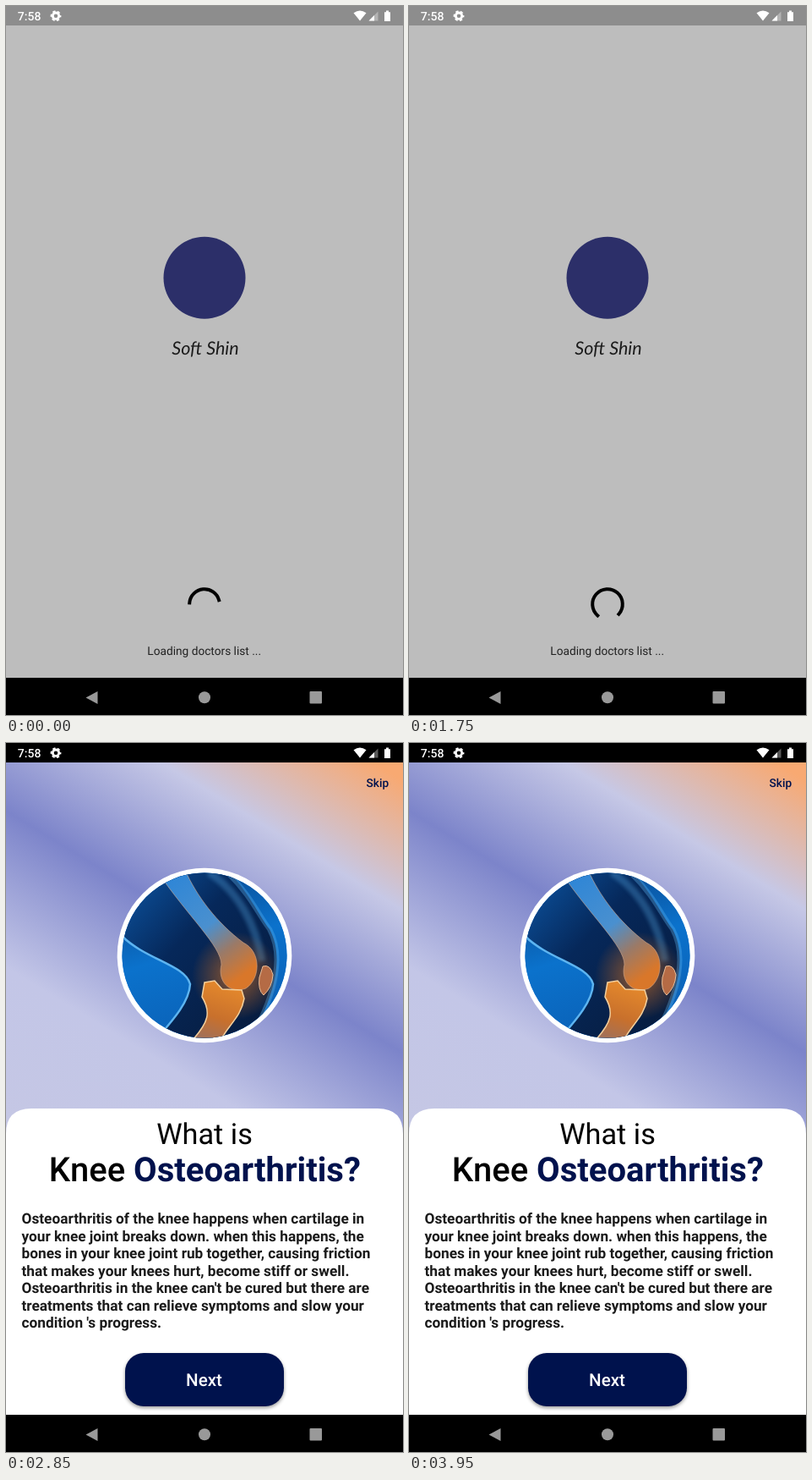
These frames come from a looping animation (470x838 px, 5000 ms). An HTML page:

```html
<!DOCTYPE html>
<html lang="en">
<head>
<meta charset="utf-8">
<title>Knee care app</title>
<style>
  html, body { margin: 0; width: 100%; height: 100%; overflow: hidden; background: #000; }
  svg { display: block; width: 470px; height: 838px; }
  text { font-family: Roboto, sans-serif; text-rendering: geometricPrecision; }
  .mid { text-anchor: middle; }
  .medium { font-weight: 500; }
  .navy { fill: #00124d; }
</style>
</head>
<body>
<svg viewBox="0 0 470 838">
  <defs>
    <linearGradient id="sky" gradientUnits="userSpaceOnUse" x1="470" y1="23" x2="0" y2="794">
      <stop offset=".02" stop-color="#f8a972"/>
      <stop offset=".165" stop-color="#c6c8e6"/>
      <stop offset=".325" stop-color="#7c84ca"/>
      <stop offset=".5" stop-color="#c3c6e7"/>
      <stop offset=".7" stop-color="#c5c7e4"/>
    </linearGradient>
    <linearGradient id="air" x1="0" y1="0" x2=".3" y2="1">
      <stop offset="0" stop-color="#0a3f80"/>
      <stop offset=".55" stop-color="#0b72cc"/>
      <stop offset="1" stop-color="#0a62b8"/>
    </linearGradient>
    <linearGradient id="skin" x1="0" y1="0" x2="1" y2="1">
      <stop offset="0" stop-color="#0c57a6"/>
      <stop offset=".4" stop-color="#06285a"/>
      <stop offset="1" stop-color="#071a3a"/>
    </linearGradient>
    <linearGradient id="femur" gradientUnits="userSpaceOnUse" x1="195" y1="160" x2="280" y2="275">
      <stop offset="0" stop-color="#2f86d6"/>
      <stop offset=".5" stop-color="#4a90cf"/>
      <stop offset=".75" stop-color="#9a7a68"/>
      <stop offset="1" stop-color="#d9772a"/>
    </linearGradient>
    <linearGradient id="tibia" x1=".6" y1="0" x2=".3" y2="1">
      <stop offset="0" stop-color="#e68a2c"/>
      <stop offset=".6" stop-color="#c8702c"/>
      <stop offset="1" stop-color="#a0705a"/>
    </linearGradient>
    <radialGradient id="glow">
      <stop offset="0" stop-color="#f07a18" stop-opacity=".6"/>
      <stop offset="1" stop-color="#f07a18" stop-opacity="0"/>
    </radialGradient>
    <clipPath id="lens"><circle cx="235" cy="251" r="97.5"/></clipPath>
    <filter id="blur"><feGaussianBlur stdDeviation="2"/></filter>
  </defs>

  <g id="splash">
    <rect width="470" height="794" fill="#bdbdbd"/>
    <rect width="470" height="23" fill="#8d8d8d"/>
    <circle cx="235" cy="321.3" r="48.5" fill="#2c2f69"/>
    <text class="mid" x="236" y="412" font-size="21.5" fill="#1c1c1c" style="font-family: Lato, cursive; font-style: italic">Soft Shin</text>
    <path id="spinner" fill="none" stroke="#000" stroke-width="4" stroke-linecap="square"/>
    <text class="mid" x="234.7" y="767" font-size="13.7" fill="#222">Loading doctors list ...</text>
  </g>

  <g id="intro">
    <rect width="470" height="23"/>
    <rect y="23" width="470" height="771" fill="url(#sky)"/>
    <text class="medium navy" x="426.5" y="51.5" font-size="13.7">Skip</text>
    <circle cx="235" cy="251" r="103.3" fill="#fff"/>
    <circle cx="235" cy="251" r="97.5" fill="#1976d2"/>
    <g id="photo" clip-path="url(#lens)">
      <rect x="137" y="153" width="196" height="196" fill="url(#air)"/>
      <path d="M137 150H262C290 180 300 205 312 220C328 250 322 290 290 350H178C200 325 217 305 218 285C210 262 165 255 137 226Z" fill="url(#skin)"/>
      <g fill="none" stroke="#5db4f0">
        <path d="M137 228C165 256 212 262 218 285C217 305 200 325 178 350" stroke-width="2.5"/>
        <path d="M262 153C290 180 300 205 312 220C328 250 322 290 290 350" stroke-width="6" opacity=".35"/>
        <path d="M240 153C275 175 296 215 303 258" stroke-width="9" opacity=".3" filter="url(#blur)"/>
      </g>
      <circle cx="272" cy="275" r="52" fill="url(#glow)"/>
      <path d="M178 150H212C225 180 250 213 281 236C302 246 302 278 284 290C266 297 250 283 255 262C255 240 215 205 178 150Z" fill="url(#femur)" stroke="#d3a98c" stroke-opacity=".6"/>
      <path d="M235 283L247 281L256 291L279 292L282 302C278 325 262 334 254 352H220C240 330 243 318 232 300Z" fill="url(#tibia)" stroke="#f3cf9c" stroke-width="1.5"/>
      <path d="M304 264Q313 261 316 274Q315 289 305 298Q298 292 300 277Z" fill="#b56b45" stroke="#e9bd97"/>
    </g>
    <path d="M0 794V462Q0 432 30 432H440Q470 432 470 462V794Z" fill="#fff"/>
    <text class="mid" x="235" y="474" font-size="34.3">What is</text>
    <text class="mid medium" x="235.3" y="518" font-size="40">Knee <tspan class="navy" font-weight="700">Osteoarthritis?</tspan></text>
    <g id="story" font-size="17.25" font-weight="700" fill="#1b1b1b"></g>
    <rect x="141" y="723" width="188" height="63" rx="22" opacity=".4" filter="url(#blur)"/>
    <rect class="navy" x="141" y="721" width="188" height="63" rx="22"/>
    <text class="mid medium" x="234.5" y="760" font-size="20.57" fill="#fff">Next</text>
  </g>

  <g fill="#fff">
    <text class="medium" x="13.8" y="17" font-size="14">7:58</text>
    <g fill="none" stroke="#fff">
      <circle cx="59" cy="11.7" r="3.7" stroke-width="2.8"/>
      <circle cx="59" cy="11.7" r="5.5" stroke-width="1.8" stroke-dasharray="3.2 2.56" stroke-dashoffset="1.6"/>
    </g>
    <path d="M411.5 8.3Q419 2.7 426.5 8.3L419 17.5Z"/>
    <path d="M440.5 6.5V17.5H429.5Z" opacity=".35"/>
    <path d="M436 11V17.5H429.5Z"/>
    <path d="M448 7.2H450V5.5H453V7.2H455V18H448Z"/>
  </g>

  <rect y="794" width="470" height="44"/>
  <g fill="#999">
    <path d="M94.5 817.5L108.5 810V825Z"/>
    <circle cx="235" cy="817.3" r="7"/>
    <rect x="359.5" y="810" width="14.5" height="14.5" rx="1"/>
  </g>
</svg>
<script>
const LOOP = 5000, INTRO_AT = 2500, PHOTO_AT = 2650, STEP = 50;
const $ = id => document.getElementById(id);

const story = [
  "Osteoarthritis of the knee happens when cartilage in",
  "your knee joint breaks down. when this happens, the",
  "bones in your knee joint rub together, causing friction",
  "that makes your knees hurt, become stiff or swell.",
  "Osteoarthritis in the knee can't be cured but there are",
  "treatments that can relieve symptoms and slow your",
  "condition 's progress."
];
$("story").innerHTML = story.map((line, i) =>
  `<text x="18.5" y="${568 + i * 20.55}">${line}</text>`).join("");

// Spinner progress in cycles; it stalls while the app is busy.
const progress = [[0, 1.194], [350, 1.444], [450, 1.444], [1000, 1.944], [1300, 2.244],
  [1550, 2.32], [1900, 2.613], [2250, 2.613], [2300, 2.7225], [2500, 2.7225]];

function cyclesAt(t) {
  const i = Math.max(1, progress.findIndex(([time]) => time >= t));
  const [t0, c0] = progress[i - 1], [t1, c1] = progress[i];
  return c0 + (c1 - c0) * (t - t0) / (t1 - t0);
}

// cubic-bezier(0.4, 0, 0.2, 1)
function ease(x) {
  x = Math.min(1, Math.max(0, x));
  let low = 0, high = 1;
  for (let i = 0; i < 24; i++) {
    const s = (low + high) / 2, r = 1 - s;
    if (1.2 * s * r * r + 0.6 * s * s * r + s ** 3 < x) low = s; else high = s;
  }
  return low * low * (3 - 2 * low);
}

function arc(start, sweep) {
  const at = deg => {
    const a = deg * Math.PI / 180;
    return `${235 + 17.8 * Math.cos(a)} ${707 + 17.8 * Math.sin(a)}`;
  };
  return `M${at(start)}A17.8 17.8 0 ${sweep > 180 ? 1 : 0} 1 ${at(start + sweep)}`;
}

function drawSpinner(t) {
  const cycles = cyclesAt(t), turn = Math.floor(cycles), phase = cycles - turn;
  const head = ease(phase * 2), tail = ease(phase * 2 - 1);
  const start = -90 + 270 * tail + 306 * phase - 144 * turn;
  $("spinner").setAttribute("d", arc(start, Math.max(0.1, 270 * (head - tail))));
}

const show = (id, on) => $(id).setAttribute("display", on ? "inline" : "none");

function render(t) {
  const intro = t >= INTRO_AT;
  show("splash", !intro);
  show("intro", intro);
  show("photo", t >= PHOTO_AT);
  if (!intro) drawSpinner(Math.floor(t / STEP) * STEP);
}

const began = performance.now();
function tick() {
  render((performance.now() - began) % LOOP);
  requestAnimationFrame(tick);
}
render(0);
requestAnimationFrame(tick);
</script>
</body>
</html>
```
